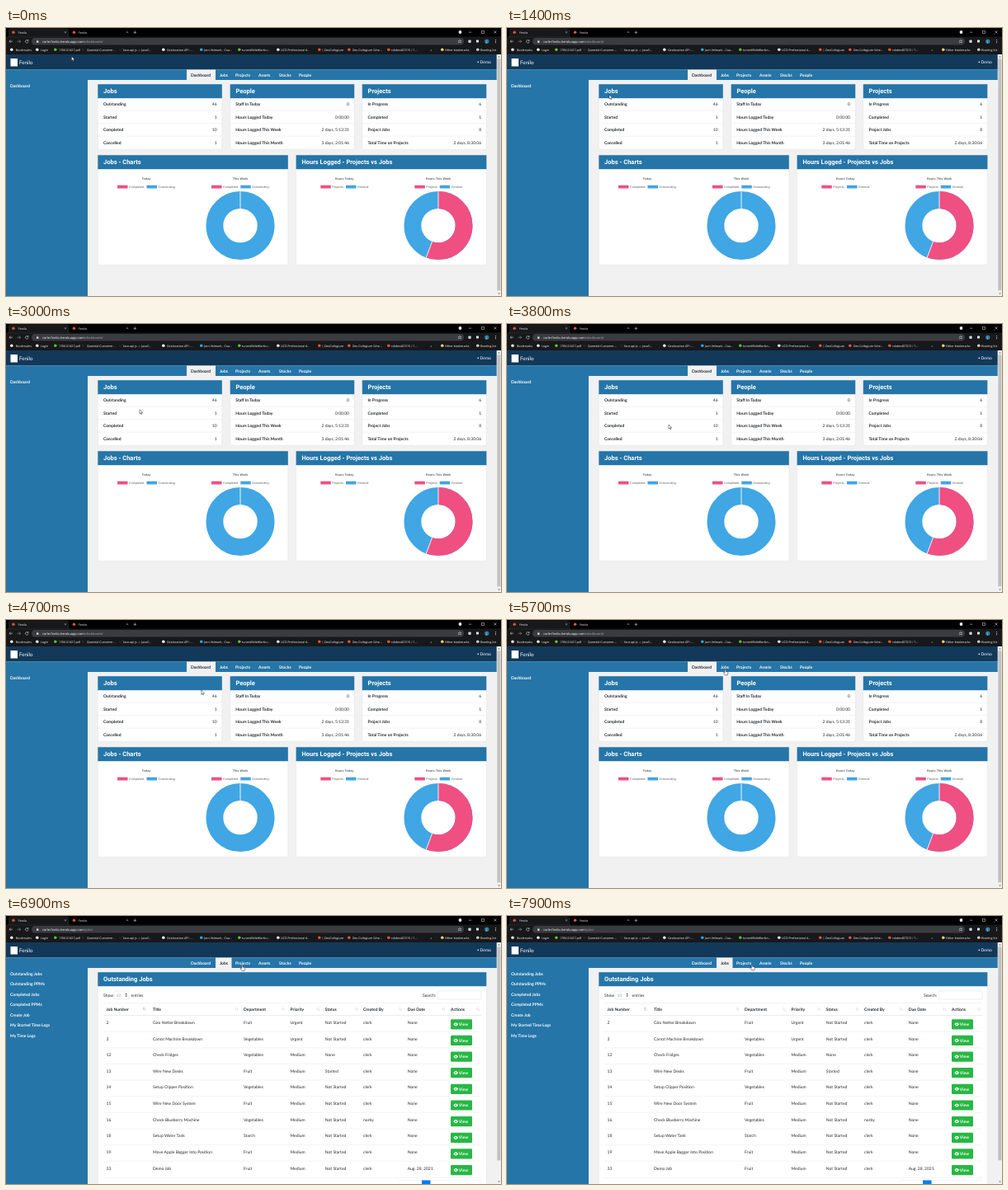
An HTML page that plays this animation: 600x325 px, repeating every 8000 ms.

```html
<!DOCTYPE html>
<html lang="en">
<head>
<meta charset="utf-8">
<title>Dashboard</title>
<style>
html, body { margin: 0; width: 100%; height: 100%; overflow: hidden; background: #f1f1f2; }
svg { display: block; width: 100vw; height: 100vh; }
text { font: 5px Lato, sans-serif; fill: #24282c; text-rendering: geometricPrecision; white-space: pre; }
.b { font-weight: 700; }
.w { fill: #fff; }
.head { font: 700 7.5px Roboto, sans-serif; fill: #fff; }
.brand { font-size: 6.25px; fill: #fff; }
.ui { font: 3.6px "Open Sans", sans-serif; fill: #fff; }
.url { font-size: 3.95px; }
.dim { fill: #a4a8ad; }
.chart { font: 3.75px "Liberation Sans", Arial, sans-serif; fill: #666; }
.chart.b { font-weight: 700; }
.end { text-anchor: end; }
.mid { text-anchor: middle; }
</style>
</head>
<body>
<svg id="stage" viewBox="0 0 600 325" preserveAspectRatio="none"></svg>
<script>
const BLUE = '#2575a8', PINK = '#f04f82', SKY = '#40a6e4', GREEN = '#28b745', BAR = '#17181a';
const LOOP = 8000, OPEN = 6400, READY = 6700, HOVER = 5250;

const text = (x, y, s, cls = '') => `<text x="${x}" y="${y}" class="${cls}">${s}</text>`;
const rect = (x, y, w, h, fill, more = '') =>
  `<rect x="${x}" y="${y}" width="${w}" height="${h}" fill="${fill}" ${more}/>`;
const dot = (x, y, r, fill) => `<circle cx="${x}" cy="${y}" r="${r}" fill="${fill}"/>`;
const line = (d, stroke, w = .5) =>
  `<path d="${d}" fill="none" stroke="${stroke}" stroke-width="${w}"/>`;
const group = (id, body) => `<g id="${id}">${body}</g>`;

// Browser window
const cross = (x, y, r, w) => line(`M${x - r} ${y - r}l${2 * r} ${2 * r}m0 ${-2 * r}l${-2 * r} ${2 * r}`, '#eee', w);

const bookmarks = [
  [5, 12, '#eee', 'Bookmarks'], [36, 42, '#e8e8e8', 'Login'], [58, 64, '#57c22d', '1706.01427.pdf'],
  [92, 98, '#222', 'Quendal Customer...'], [137, 142, '#222', 'face-api.js — JavaS...'],
  [189, 195, '#f2f2f2', 'Geolocation API -...'], [235, 240, '#2da7df', 'Jorn Velmark - Coa...'],
  [281, 286, '#5cc02f', 'tunesWhileWorkin...'], [328, 333, '#dbe6ee', 'UCD Professional A...'],
  [378, 383, '#e25433', '| DevCollegium'], [414, 420, '#e25433', 'Dev Collegium Sche...'],
  [462, 467, '#e25433', 'rvkdev407215 / 1...'], [527, 532, '#f0cf6a', 'Other bookmarks'],
  [570, 575, '#ccc', 'Reading list']
];

function chrome() {
  let s = rect(0, 0, 600, 11, '#000') + rect(0, 10.5, 600, 21.5, BAR) +
    `<path d="M2 11Q3.500 11 3.500 9V2.500Q3.500 1 5 1H74Q75.500 1 75.500 2.500V9Q75.500 11 77 11Z" fill="${BAR}" stroke="#3a3b3d" stroke-width=".4"/>` +
    rect(31, 12, 524, 8.5, '#3a3b3e', 'rx="4.2"');
  s += dot(82.5, 5.3, 1.8, '#d9523f') + text(88, 6.8, 'Fenilo', 'ui');
  s += cross(72, 5.2, 1, .4) + cross(147, 5.2, 1, .4) + line('M154.500 5.300h3.600m-1.800-1.800v3.600', '#eee');
  s += dot(550.5, 5, 1.9, '#f2f2f2') + line('M561 5.200h3.200M576.500 3.500h3v3h-3z', '#eee', .5) + cross(593, 5, 1.5, .5);
  s += line('M8 16.200H4m1.800-1.800L4 16.200l1.800 1.800', '#eee') + line('M13.500 16.200h4m-1.800-1.800l1.800 1.800l-1.800 1.800', '#aaa');
  s += rect(37, 15.8, 2.4, 2, '#ddd') + line('M37.500 16v-.8q.7-1.300 1.400 0v.8', '#ddd', .4);
  s += line('M550 14.200l.6 1.400h1.500l-1.200 1 .5 1.500-1.400-.9-1.400.9.5-1.500-1.200-1h1.500z', '#eee', .4);
  s += rect(560.3, 14.5, 3.4, 3.4, '#c9ccd0', 'rx=".8"') + rect(570, 14.6, 3, 3, '#eee', 'rx=".5"') +
    dot(582.8, 16.2, 2.7, '#2e7ca6') + text(582.8, 17.5, 'J', 'ui mid');
  s += [14.6, 16.2, 17.8].map(y => dot(593.5, y, .5, '#eee')).join('');
  s += bookmarks.map(([ix, x, c, name]) => dot(ix + 1.8, 26.2, 1.8, c) + text(x, 27.5, name, 'ui')).join('');
  return s + text(514.5, 27.5, '»', 'ui');
}

const tabIdle = dot(9, 5.3, 1.8, '#d9523f') + text(15, 6.8, 'Fenilo', 'ui') +
  line('M26.600 15.200A1.800 1.800 0 1 0 27 16.600M27 14v1.500h-1.500', '#eee');
const tabBusy = '<g id="spin">' + line('M9 3.500A1.800 1.800 0 1 1 7.200 5.300', '#bbb', .6) + '</g>' +
  `<g clip-path="url(#tab)">${text(12.5, 6.8, 'https://corle-fenilo.herokuapp.com/jobs/', 'ui')}</g>` + cross(25.3, 16.2, 1.5, .5);
const address = path =>
  `<text x="44" y="17.6" class="ui url">corle-fenilo.herokuapp.com<tspan class="dim">${path}</tspan></text>`;

// Shared page frame
const tabs = [[224, 'Dashboard', 219, 35], [259, 'Jobs', 254, 19.5], [278, 'Projects'], [306, 'Assets'], [331, 'Stocks'], [355, 'People']];

const frame = () =>
  rect(0, 32, 600, 293, '#f1f1f2') + rect(0, 32, 595, 18.5, '#12395a') + rect(0, 50.5, 595, 12.5, BLUE) +
  rect(0, 63, 99, 262, BLUE) +
  rect(5.5, 37, 8.5, 9.5, '#fff') + text(16, 43.8, 'Fenilo', 'brand') +
  '<path d="M571 40.800l2.400 0l-1.200 1.600z" fill="#fff"/>' + text(574.5, 43.2, 'Demo', 'w') +
  rect(594.7, 32, 5.3, 293, '#f1f1f1') +
  '<path d="M596.200 35.500l1.300-1.500 1.300 1.500zM596.200 321.500l1.300 1.500 1.300-1.500z" fill="#666"/>';

const nav = active => tabs.map(([x, name, bx, bw], i) =>
  (i === active ? rect(bx, 50.5, bw, 12.5, '#f1f1f2') : '') +
  text(x, 58.8, name, i === active ? 'b' : 'b w')).join('');
const side = names => names.map((n, i) => text(5, 71.9 + i * 12.5, n, 'b w')).join('');
const thumb = h => rect(595.4, 37.3, 4, h, '#c1c1c1');

function card(x, y, w, h, title) {
  return rect(x, y, w, h, '#fff', 'stroke="#dcdcde" stroke-width=".4" rx="1.2"') +
    rect(x, y, w, 17, BLUE) + text(x + 6.8, y + 11.1, title, 'head');
}

// Dashboard
const lists = [
  [111.3, 'Jobs', ['Outstanding', 46, 'Started', 1, 'Completed', 10, 'Cancelled', 1]],
  [271.7, 'People', ['Staff In Today', 0, 'Hours Logged Today', '0:00:00',
    'Hours Logged This Week', '2 days, 5:13:31', 'Hours Logged This Month', '3 days, 2:01:46']],
  [431.8, 'Projects', ['In Progress', 6, 'Completed', 1, 'Project Jobs', 8, 'Total Time on Projects', '2 days, 8:30:06']]
];

function list([x, title, cells]) {
  let s = card(x, 68.2, 150.5, 79, title);
  for (let i = 0; i < 4; i++) {
    const y = 94.3 + i * 15.4;
    s += text(x + 6.6, y, cells[2 * i], 'b') + text(x + 144.3, y, cells[2 * i + 1], 'end');
    if (i) s += line(`M${x} ${y - 9.3}h150.500`, '#e3e3e5', .4);
  }
  return s;
}

function legend(cx, title, x1, a, x2, b) {
  return text(cx, 183.8, title, 'chart b mid') +
    rect(x1, 190.7, 12.5, 3.8, PINK) + text(x1 + 14, 193.9, a, 'chart') +
    rect(x2, 190.7, 12.5, 3.8, SKY) + text(x2 + 14, 193.9, b, 'chart');
}

function donut(cx, share) {
  const cy = 239.6, mid = 31.1, thick = 20.8, len = 2 * Math.PI * mid;
  const ring = (color, dash) => `<circle cx="${cx}" cy="${cy}" r="${mid}" fill="none" stroke="${color}"
    stroke-width="${thick}" stroke-dasharray="${dash} ${len}" transform="rotate(-90 ${cx} ${cy})"/>`;
  const seam = part => {
    const a = part * 2 * Math.PI, at = r => `${cx + r * Math.sin(a)} ${cy - r * Math.cos(a)}`;
    return line(`M${at(20)}L${at(42)}`, '#fff', .9);
  };
  return ring(SKY, len) + (share ? ring(PINK, len * share) + seam(share) : '') + seam(0);
}

const dashboard = () => nav(0) + side(['Dashboard']) + thumb(281) + lists.map(list).join('') +
  card(111.3, 154.2, 230.5, 133, 'Jobs - Charts') +
  card(351.6, 154.2, 230.8, 133, 'Hours Logged - Projects vs Jobs') +
  legend(170, 'Today', 135, 'Completed', 170.5, 'Outstanding') +
  legend(284, 'This Week', 249, 'Completed', 284.3, 'Outstanding') +
  legend(410, 'Hours Today', 381.3, 'Projects', 412, 'General') +
  legend(524, 'Hours This Week', 495.3, 'Projects', 525.7, 'General') +
  donut(284, 0) + donut(524, .558);

// Jobs
const heads = ['Job Number', 'Title', 'Department', 'Priority', 'Status', 'Created By', 'Due Date', 'Actions'];
const job = (id, title, dept = 'Fruit', by = 'clerk', prio = 'Medium', status = 'Not Started', due = 'None') =>
  [id, title, dept, prio, status, by, due];
const V = 'Vegetables';
const carrot = job(3, 'Carrot Machine Breakdown', V, 'clerk', 'Urgent');
const tank = job(18, 'Setup Water Tank', 'Starch');
const berry = job(16, 'Check Blueberry Machine', V, 'norby');
const bagger = job(19, 'Move Apple Bagger Into Position');
const fridge = job(12, 'Check Fridges', V, 'clerk', 'Medium', 'None');
const clipper = job(14, 'Setup Clipper Position', V);
const demo = job(33, 'Demo Job', 'Fruit', 'clerk', 'Medium', 'Not Started', 'Aug. 28, 2021');

const plainRows = [carrot, job(58, 'dggdhgfhgsdfg'), job(59, 'fdhfgdfgadfdgfdga', V, 'norby'), tank, berry, bagger,
  job(46, 'ghsfghdzasdagrhs'), fridge, clipper, job(47, 'hdhgcvnbmgshmj'), demo];
const sortedRows = [job(2, 'Giro Netter Breakdown', 'Fruit', 'clerk', 'Urgent'), carrot, fridge,
  job(13, 'Wire New Desks', 'Fruit', 'clerk', 'Medium', 'Started'), clipper,
  job(15, 'Wire New Door System'), berry, tank, bagger, demo];

const eye = y => `<path d="M542.300 ${y}q2.900-4.200 5.800 0q-2.900 4.200-5.800 0z" fill="#fff"/>` + dot(545.2, y, .9, GREEN);

function table(cols, rows, top, rich) {
  let s = heads.map((h, i) => text(cols[i], top, h, 'b')).join('');
  rows.forEach((cells, r) => {
    const y = top + 15.9 + r * 19.64;
    s += line(`M118 ${y - 10.4}H576`, '#dee0e3', r ? .35 : .6);
    s += cells.map((c, i) => text(cols[i], y, c)).join('');
    s += rect(539, y - 5.7, rich ? 26 : 19.5, 12.2, GREEN, 'rx="1.2"');
    s += (rich ? eye(y + .4) : '') + text(rich ? 548.8 : 543, y + 2.1, 'View', 'b w');
  });
  return s;
}

const sorter = (x, i) =>
  line(`M${x} 114.800v-3.600m-.8 1l.8-1 .8 1`, i ? '#ccc' : '#777', .4) +
  line(`M${x + 2} 111.200v3.600m-.8-1l.8 1 .8-1`, '#ccc', .4);

const jobs = () => nav(1) + side(['Outstanding Jobs', 'Outstanding PPMs', 'Completed Jobs', 'Completed PPMs',
  'Create Job', 'My Started Time Logs', 'My Time Logs']) + card(111.3, 68.2, 471, 270, 'Outstanding Jobs');

const plain = () => thumb(91) + table([121.5, 173.3, 293, 345, 383.7, 433.8, 482, 539], plainRows, 101, false);

const sorted = () => thumb(259) +
  text(118, 97.8, 'Show') + rect(131, 91, 18, 9.8, '#fff', 'stroke="#ced4da" stroke-width=".4" rx="1"') +
  text(133.5, 97.8, '10', 'dim') + '<path d="M144.500 95.300l1.200-1.700 1.200 1.700zM144.500 96.500l1.200 1.700 1.200-1.700z" fill="#444"/>' +
  text(151.5, 97.8, 'entries') + text(505, 97.8, 'Search:') +
  rect(523, 91, 53, 9.8, '#fff', 'stroke="#ced4da" stroke-width=".4" rx="1"') +
  line('M118 105.500H576', '#dee0e3', .35) +
  table([121.5, 178, 288, 344.5, 386.8, 433, 486.7, 539], sortedRows, 115, true) +
  [167, 278.5, 335, 377.3, 423.5, 477, 529.5, 571].map(sorter).join('') +
  line('M118 317.500H576', '#dee0e3', .35) +
  rect(476, 320.5, 100, 10, '#fff', 'stroke="#dee2e6" stroke-width=".4" rx="1"') + rect(504, 320.5, 10.5, 10, '#087bfa');

// Pointer
const pointer = (id, d) =>
  `<path id="${id}" d="${d}" fill="#fff" stroke="#111" stroke-width=".45" stroke-linejoin="round"/>`;
const arrowShape = 'M0 0V5.200L1.200 4.100L2 5.900L2.800 5.500L2 3.800H3.700Z';
const handShape = 'M-.6.6Q0-.5.6.6V2.300L3 2.900Q3.300 3 3.300 3.500V4.800L2.600 6.800H-.2L-2 4.300Q-2 3.300-1.200 3.600L-.6 4.200Z';

const track = [[0, 79.5, 34.5], [1400, 124, 81], [2200, 128, 85.5], [3800, 196, 122],
  [5300, 264, 60.5], [5700, 264.5, 60], [6200, 266, 60], [6500, 282, 60], [7900, 297, 59], [LOOP, 297.5, 59]];

function place(t) {
  const i = track.findIndex(k => k[0] > t);
  const [t0, x0, y0] = track[i - 1], [t1, x1, y1] = track[i];
  const p = (t - t0) / (t1 - t0);
  return [x0 + (x1 - x0) * p, y0 + (y1 - y0) * p];
}

const stage = document.getElementById('stage');
stage.innerHTML = '<clipPath id="tab"><rect x="12" y="0" width="57.5" height="11"/></clipPath>' +
  chrome() + frame() + group('idle', tabIdle) + group('busy', tabBusy) +
  group('home', dashboard() + address('/dashboard/')) + group('jobs', jobs() + address('/jobs/')) +
  group('plain', plain()) + group('sorted', sorted()) +
  pointer('arrow', arrowShape) + pointer('hand', handShape);

const part = id => document.getElementById(id);
const show = (id, on) => part(id).style.display = on ? '' : 'none';

function draw(now) {
  const t = Math.floor((now % LOOP) / 100) * 100;
  const loading = t >= OPEN && t < READY;
  show('home', t < OPEN);
  show('jobs', t >= OPEN);
  show('plain', loading);
  show('sorted', t >= READY);
  show('idle', !loading);
  show('busy', loading);
  show('arrow', t < HOVER);
  show('hand', t >= HOVER);
  part('spin').setAttribute('transform', `rotate(${t * .36} 9 5.3)`);
  const [x, y] = place(t);
  for (const id of ['arrow', 'hand']) part(id).setAttribute('transform', `translate(${x} ${y})`);
  requestAnimationFrame(draw);
}
requestAnimationFrame(draw);
</script>
</body>
</html>
```
